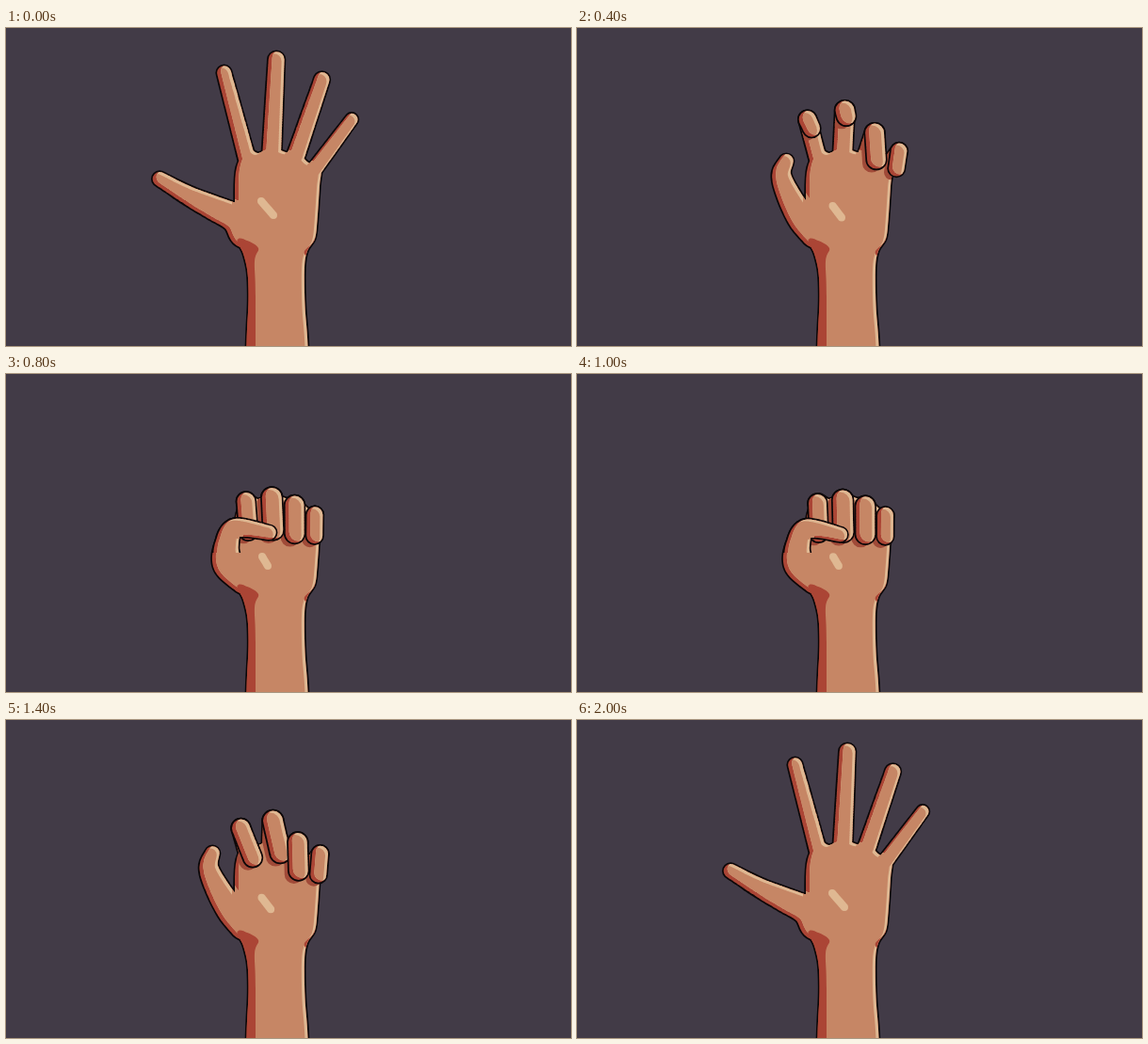
An HTML page with a canvas that plays this animation: 600 px wide and 338 px high, repeating every 2.1 s.

```html
<!DOCTYPE html>
<html lang="en">
<head>
<meta charset="utf-8">
<title>Hand opening and closing</title>
<style>
  html, body { margin: 0; width: 100%; height: 100%; overflow: hidden; background: #423b47; }
  canvas { display: block; width: 100vw; height: 100vh; }
</style>
</head>
<body>
<canvas id="stage" width="600" height="338"></canvas>
<script>
const ctx = document.getElementById('stage').getContext('2d');
const { PI, sin, cos, min, max } = Math;
const STEP = 100, STEPS = 21;
const COLOR = {
  back: '#423b47', line: '#0b0708', skin: '#c68665',
  shade: '#ab4535', cast: '#a04a38', light: '#dfb892'
};

// angle is measured from vertical; lead makes a finger fold earlier than the others.
const fingers = [
  { x: 256, y: 139.5, angle: -0.26, length: 95, r: 9, lead: 0 },
  { x: 282, y: 136.5, angle: 0.05, length: 103, r: 10, lead: -0.03 },
  { x: 306, y: 141, angle: 0.33, length: 91, r: 9.5, lead: 0.2 },
  { x: 327, y: 151, angle: 0.64, length: 67, r: 8, lead: 0.15 }
];

// How far the fingers and the thumb are folded: 0 open, 1 closed.
const keys = [
  { at: 0, curl: 0, thumb: 0 },
  { at: 4, curl: 0.4, thumb: 0.5 },
  { at: 6, curl: 0.84, thumb: 0.78 },
  { at: 8, curl: 0.95, thumb: 1 },
  { at: 12, curl: 1, thumb: 1.03 },
  { at: 14, curl: 0.69, thumb: 0.47 },
  { at: 16, curl: 0.02, thumb: -0.06 },
  { at: 18, curl: 0, thumb: 0 },
  { at: STEPS, curl: 0, thumb: 0 }
];

const palm = smooth([
  [254, 420], [255.5, 335], [257.5, 290], [256.5, 260], [252, 240], [245, 222],
  [243, 178], [245, 148], [256, 128], [268, 133], [282, 126], [297, 132],
  [308, 131], [321, 143], [334, 149], [333, 168], [330.5, 205],
  [328, 224], [320, 237], [317, 255], [317.5, 295], [320.5, 338], [322, 420]
]);
const wristShade = smooth([
  [246, 225], [256, 226], [268, 234], [264, 248], [265, 290], [263, 420], [248, 420], [246, 245]
]);
const wristNotch = smooth([[329, 222], [325, 229], [317, 237], [319, 242], [326, 236]]);

const lerp = (a, b, k) => a + (b - a) * k;

function spline(a, b, c, d, t) {
  return b + 0.5 * t * (c - a + t * (2 * a - 5 * b + 4 * c - d + t * (3 * (b - c) + d - a)));
}

// Closed curve through the given points.
function smooth(pts) {
  const path = new Path2D(), n = pts.length;
  const at = i => pts[(i + n) % n];
  path.moveTo(...pts[0]);
  for (let i = 0; i < n; i++) {
    const [a, b, c, d] = [at(i - 1), at(i), at(i + 1), at(i + 2)];
    path.bezierCurveTo(
      b[0] + (c[0] - a[0]) / 6, b[1] + (c[1] - a[1]) / 6,
      c[0] - (d[0] - b[0]) / 6, c[1] - (d[1] - b[1]) / 6, c[0], c[1]);
  }
  path.closePath();
  return path;
}

// Tapered rounded limb, swept along points [x, y, radius].
function limb(...pts) {
  const path = new Path2D(), last = pts.length - 1;
  for (let i = 0; i < last; i++) {
    const a = pts[max(i - 1, 0)], b = pts[i], c = pts[i + 1], d = pts[min(i + 2, last)];
    for (let k = 0; k <= 24; k++) {
      const [x, y, r] = [0, 1, 2].map(j => spline(a[j], b[j], c[j], d[j], k / 24));
      path.moveTo(x + r, y);
      path.arc(x, y, r, 0, PI * 2);
    }
  }
  return path;
}

// Both halves turn towards the viewer; the outer one turns faster and ends pointing down.
function bendFinger({ x, y, angle, length, r, lead }, curl) {
  const c = min(1, curl + lead * sin(PI * curl));
  const near = 0.57 * length * cos(c * PI / 2);
  const turn = cos(PI * min(1, 1.5 * c));
  const out = 0.43 * length * max(turn, 0), down = 0.33 * length * max(-turn, 0);
  const tilt = (0.3 - 0.7 * angle) * sin(PI * c);
  const fold = (1 - turn) / 2;
  const kx = x + near * sin(angle), ky = y - near * cos(angle);
  return {
    folded: turn < 0,
    base: [x, y, r],
    knuckle: [kx, ky, r - 0.8 + 1.3 * fold],
    tip: [kx + out * sin(angle) + down * tilt, ky - out * cos(angle) + down, r - 1.5 + 2 * fold]
  };
}

// Points from the tip to the root.
function bendThumb(t) {
  const rx = 243 - 8 * t, ry = 202;
  const a = -1.12 + 1.34 * t, la = 54 - 15 * t * t;
  const b = -1.05 + 2.75 * t, lb = 36 - 20 * max(0, sin(PI * t));
  const jx = rx + la * sin(a), jy = ry - la * cos(a);
  return [
    [jx + lb * sin(b), jy - lb * cos(b), 7.5],
    [jx, jy, 10],
    [(rx + jx) / 2 - 5 * t, (ry + jy) / 2, 12.5],
    [rx, ry, 15]
  ];
}

function within(path, draw) {
  ctx.save();
  ctx.clip(path);
  draw();
  ctx.restore();
}

function flood(color) {
  ctx.fillStyle = color;
  ctx.fillRect(-50, -50, 700, 450);
}

function fill(path, color) {
  ctx.fillStyle = color;
  ctx.fill(path);
}

// Outline, shadow at lower left, light at upper right.
function paint(path) {
  ctx.strokeStyle = COLOR.line;
  ctx.lineWidth = 3.4;
  ctx.stroke(path);
  within(path, () => {
    flood(COLOR.shade);
    ctx.translate(4, -2);
    ctx.clip(path);
    flood(COLOR.light);
    ctx.translate(-7, 4);
    fill(path, COLOR.skin);
  });
}

function poseAt(step) {
  const i = keys.findIndex(key => key.at > step);
  const a = keys[i - 1], b = keys[i];
  const k = (step - a.at) / (b.at - a.at), ease = k * k * (3 - 2 * k);
  return { curl: lerp(a.curl, b.curl, ease), thumb: lerp(a.thumb, b.thumb, ease) };
}

function draw(step) {
  const pose = poseAt(step), t = pose.thumb;
  const thumb = bendThumb(t);
  const folded = [];
  const hand = new Path2D(palm);

  for (const finger of fingers) {
    const { base, knuckle, tip, ...bend } = bendFinger(finger, pose.curl);
    hand.addPath(bend.folded ? limb(base, knuckle) : limb(base, knuckle, tip));
    if (bend.folded) folded.push(limb(knuckle, tip));
  }
  hand.addPath(limb(...thumb, [255, 215, 19]));

  flood(COLOR.back);
  paint(hand);
  within(hand, () => {
    fill(wristShade, COLOR.shade);
    fill(wristNotch, COLOR.shade);
    ctx.translate(-5, 4);
    folded.forEach(path => fill(path, COLOR.cast));
  });

  fill(limb([271 + t, 184 + 10 * t, 4], [284 - 6 * t, 199 + 5 * t, 4]), COLOR.light);
  folded.forEach(paint);

  // A thumb closed across the fingers lies on top; its root melts into the palm.
  if (t > 0.6) {
    const front = new Path2D();
    front.rect(0, 0, 600, thumb[3][1] - 12);
    within(front, () => paint(limb(...thumb)));
  }
}

const start = performance.now();
let shown = -1;
function tick() {
  const step = Math.floor((performance.now() - start) / STEP) % STEPS;
  if (step !== shown) draw(shown = step);
  requestAnimationFrame(tick);
}
tick();
</script>
</body>
</html>
```
